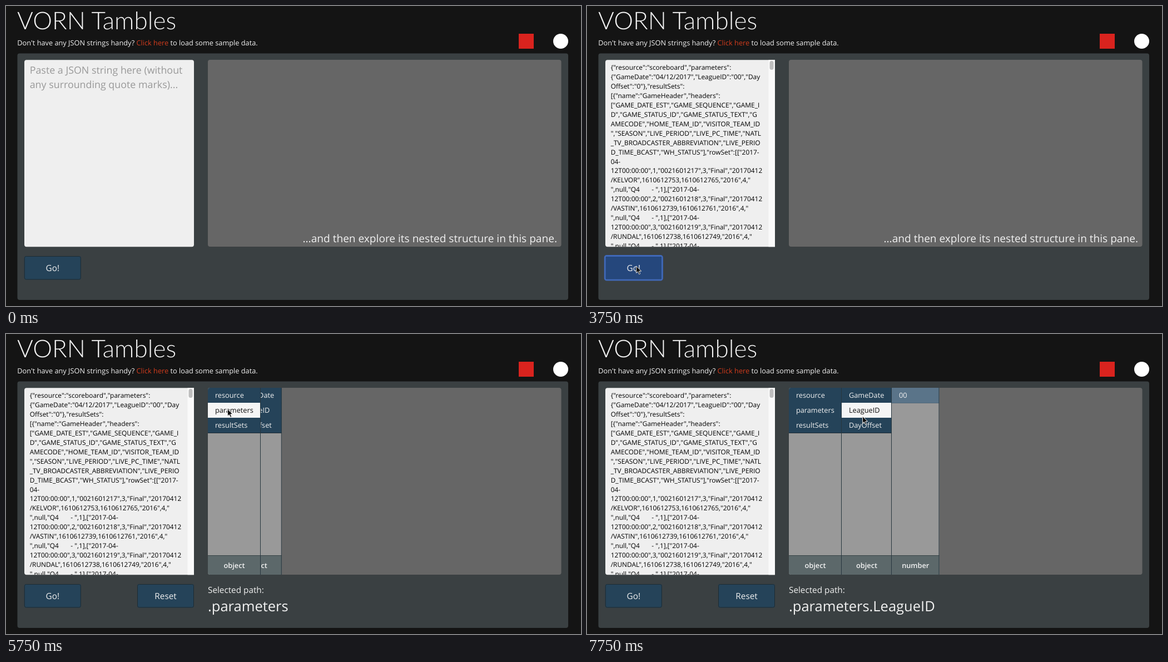
Animation of 1034x541 px, one loop 8 s. Source, as an HTML page with a canvas:

```html
<!DOCTYPE html>
<html lang="en">
<head>
<meta charset="utf-8">
<title>Tree browser demo</title>
<style>
  html, body { margin: 0; width: 100%; height: 100%; overflow: hidden; background: #141414; }
  canvas { display: block; width: 1034px; height: 541px; }
</style>
</head>
<body>
<canvas id="stage" width="1034" height="541"></canvas>
<script>
const ctx = document.getElementById('stage').getContext('2d');
const LOOP = 8000;
const RED = '#d23c1d', NAVY = '#254359', LINE = '#1d2b33';
const SANS = '"Open Sans", "Noto Sans", sans-serif';

const SAMPLE = [
  '{"resource":"scoreboard","parameters":',
  '{"GameDate":"04/12/2017","LeagueID":"00","Day',
  'Offset":"0"},"resultSets":',
  '[{"name":"GameHeader","headers":',
  '["GAME_DATE_EST","GAME_SEQUENCE","GAME_I',
  'D","GAME_STATUS_ID","GAME_STATUS_TEXT","G',
  'AMECODE","HOME_TEAM_ID","VISITOR_TEAM_ID',
  '","SEASON","LIVE_PERIOD","LIVE_PC_TIME","NATL',
  '_TV_BROADCASTER_ABBREVIATION","LIVE_PERIO',
  'D_TIME_BCAST","WH_STATUS"],"rowSet":[["2017-',
  '04-',
  ...game(1, 'KELVOR', '1610612753,1610612765'),
  ...game(2, 'VASTIN', '1610612739,1610612761'),
  ...game(3, 'RUNDAL', '1610612738,1610612749')
];

function game(n, code, teams) {
  return [
    `12T00:00:00",${n},"002160121${n + 6}",3,"Final","20170412`,
    `/${code}",${teams},"2016",4,"`,
    '",null,"Q4       - ",1],["2017-04-'
  ];
}

const COLUMNS = [
  { x: 363, w: 95, rows: ['resource', 'parameters', 'resultSets'], type: 'object' },
  { x: 458, w: 90, rows: ['GameDate', 'LeagueID', 'DayOffset'], type: 'object' },
  { x: 548, w: 85.5, rows: ['00'], type: 'number', value: true }
];

// Each step overrides part of the state from its time on.
const STEPS = [
  [0, { link: RED, go: NAVY, slide: [0, 0, 0], path: '' }],
  [250, { cursor: [503, 44] }],
  [500, { cursor: [496, 58] }],
  [1250, { cursor: [392, 66] }],
  [1500, { cursor: [279, 72], link: '#33508f' }],
  [1750, { cursor: [270.5, 72.5] }],
  [2250, { loaded: true }],
  [2500, { cursor: [248, 128], link: RED }],
  [2750, { cursor: [168, 325] }],
  [3000, { cursor: [98, 448] }],
  [3250, { cursor: [88, 468.5], go: '#28496c' }],
  [3500, { ring: true, go: '#25466d' }],
  [3750, { go: '#25477c' }],
  [4000, { cursor: [110, 464], go: '#2d5797', slide: [1, 0, 0], open: true }],
  [4250, { cursor: [249, 436] }],
  [4500, { cursor: [447, 213] }],
  [4750, { cursor: [412, 152] }],
  [5000, { cursor: [399, 138], hover: 'parameters' }],
  [5250, { cursor: [398, 135] }],
  [5750, { slide: [1, 0.42, 0], path: '.parameters', ring: false, go: NAVY }],
  [6000, { slide: [1, 1, 0] }],
  [6250, { cursor: [442, 136] }],
  [6500, { cursor: [495, 135], hover: 'LeagueID' }],
  [7000, { slide: [1, 1, 0.42], path: '.parameters.LeagueID' }],
  [7250, { slide: [1, 1, 1] }],
  [7500, { cursor: [495, 142] }],
  [7750, { cursor: [495, 148] }]
];

function stateAt(time) {
  return Object.assign({}, ...STEPS.filter(([start]) => start <= time).map(([, change]) => change));
}

function rect(x, y, w, h, color) {
  ctx.fillStyle = color;
  ctx.fillRect(x, y, w, h);
}

function roundPath(x, y, w, h, r) {
  ctx.beginPath();
  ctx.roundRect(x, y, w, h, r);
}

function roundBox(x, y, w, h, r, color) {
  roundPath(x, y, w, h, r);
  ctx.fillStyle = color;
  ctx.fill();
}

function text(string, x, y, size, color = '#f1f1f1', align = 'left', weight = 400, family = SANS) {
  ctx.font = `${weight} ${size}px ${family}`;
  ctx.textRendering = 'geometricPrecision';
  ctx.textAlign = align;
  ctx.fillStyle = color;
  ctx.fillText(string, x, y);
  return ctx.measureText(string).width;
}

function clipped(x, y, w, h, r, draw) {
  ctx.save();
  roundPath(x, y, w, h, r);
  ctx.clip();
  draw();
  ctx.restore();
}

function drawHeader(state) {
  text('VORN Tambles', 20, 42, 44, '#f4f4f4', 'left', 300, 'Lato, sans-serif');
  let x = 20.3;
  x += text("Don't have any JSON strings handy? ", x, 71, 12.75);
  x += text('Click here', x, 71, 12.75, state.link);
  text(' to load some sample data.', x, 71, 12.75);
  rect(922, 50, 27, 27, '#d9231e');
  roundBox(984, 50, 27, 27, 13.5, '#fff');
}

function drawInput(state) {
  const corners = state.loaded ? [4, 0, 0, 4] : 4;
  roundBox(33, 97.3, 305, 337, corners, '#efefef');
  if (!state.loaded) {
    text('Paste a JSON string here (without', 42.7, 122, 17.85, '#999');
    text('any surrounding quote marks)...', 42.7, 147.5, 17.85, '#999');
    return;
  }
  clipped(33, 97.3, 305, 337, corners, () => {
    rect(326.5, 97, 12, 338, '#fafafa');
    roundBox(328.5, 99, 7, 16, 3.5, '#bebebe');
    SAMPLE.forEach((line, i) => text(line, 42.7, 115.2 + i * 16.93, 11.9, '#000'));
  });
}

function drawButton(label, x, color, ring) {
  roundBox(x, 451, 102, 42.5, 3, color);
  roundPath(x + 0.5, 451.5, 101, 41.5, 3);
  ctx.lineWidth = 1;
  ctx.strokeStyle = LINE;
  ctx.stroke();
  if (ring) {
    roundPath(x - 0.5, 450.5, 103, 43.5, 3);
    ctx.lineWidth = 3;
    ctx.strokeStyle = '#3f68b8';
    ctx.stroke();
  }
  text(label, x + 51, 478.3, 15.3, '#f1f1f1', 'center');
}

function drawColumn({ x, w, rows, type, value }, slide, hover) {
  const left = x - w * (1 - slide);
  rect(left, 97, w, 337, '#999');
  rows.forEach((label, i) => {
    const y = 97 + i * 27;
    const lit = label === hover;
    rect(left, y, w, 27, lit ? '#f5f5f5' : value ? '#5a7489' : NAVY);
    rect(left, y + 27, w, 1, value ? '#526879' : LINE);
    text(label, left + 12.9, y + 18, 12.75, lit ? '#111' : '#f1f1f1');
  });
  rect(left, 399, w, 35, '#5c686a');
  rect(left, 399, w, 1, '#384447');
  text(type, left + w / 2, 421.5, 12.75, '#f4f4f4', 'center', 600);
  rect(left + w - 1, 97, 1, 337, '#27363e');
}

function drawPane(state) {
  clipped(363, 97, 635.5, 337, 4, () => {
    rect(363, 97, 636, 337, '#666');
    if (!state.path) {
      const hint = state.open
        ? 'Click on any row to view its contents.'
        : '...and then explore its nested structure in this pane.';
      text(hint, 991, 426, 19.1, '#f1f1f1', 'right');
    }
    // Later columns slide out from behind earlier ones.
    for (let i = COLUMNS.length - 1; i >= 0; i--) {
      if (state.slide[i]) drawColumn(COLUMNS[i], state.slide[i], state.hover);
    }
  });
  if (state.open) {
    text('Selected path:', 363, 467.3, 15.3);
    text(state.path, 363, 500, 25.5);
  }
}

function drawCursor([x, y]) {
  ctx.save();
  ctx.translate(x, y);
  ctx.beginPath();
  [[0, 0], [0, 12.5], [2.9, 9.9], [5, 14.7], [7.2, 13.8], [5.2, 9.1], [9.2, 9.1]]
    .forEach(([px, py]) => ctx.lineTo(px + 0.5, py + 0.5));
  ctx.closePath();
  ctx.fillStyle = '#0c0c0c';
  ctx.fill();
  ctx.lineWidth = 1;
  ctx.strokeStyle = '#e8e8e8';
  ctx.stroke();
  ctx.restore();
}

function draw(time) {
  const state = stateAt(time);
  rect(0, 0, 1034, 541, '#141414');
  drawHeader(state);
  roundBox(20.5, 85.5, 990.5, 444.5, 4, '#3a4042');
  drawInput(state);
  drawPane(state);
  drawButton('Go!', 32.8, state.go, state.ring);
  if (state.open) drawButton('Reset', 236, NAVY);
  if (state.cursor) drawCursor(state.cursor);
}

const begin = performance.now();
function tick() {
  draw((performance.now() - begin) % LOOP);
  requestAnimationFrame(tick);
}
tick();
</script>
</body>
</html>
```
